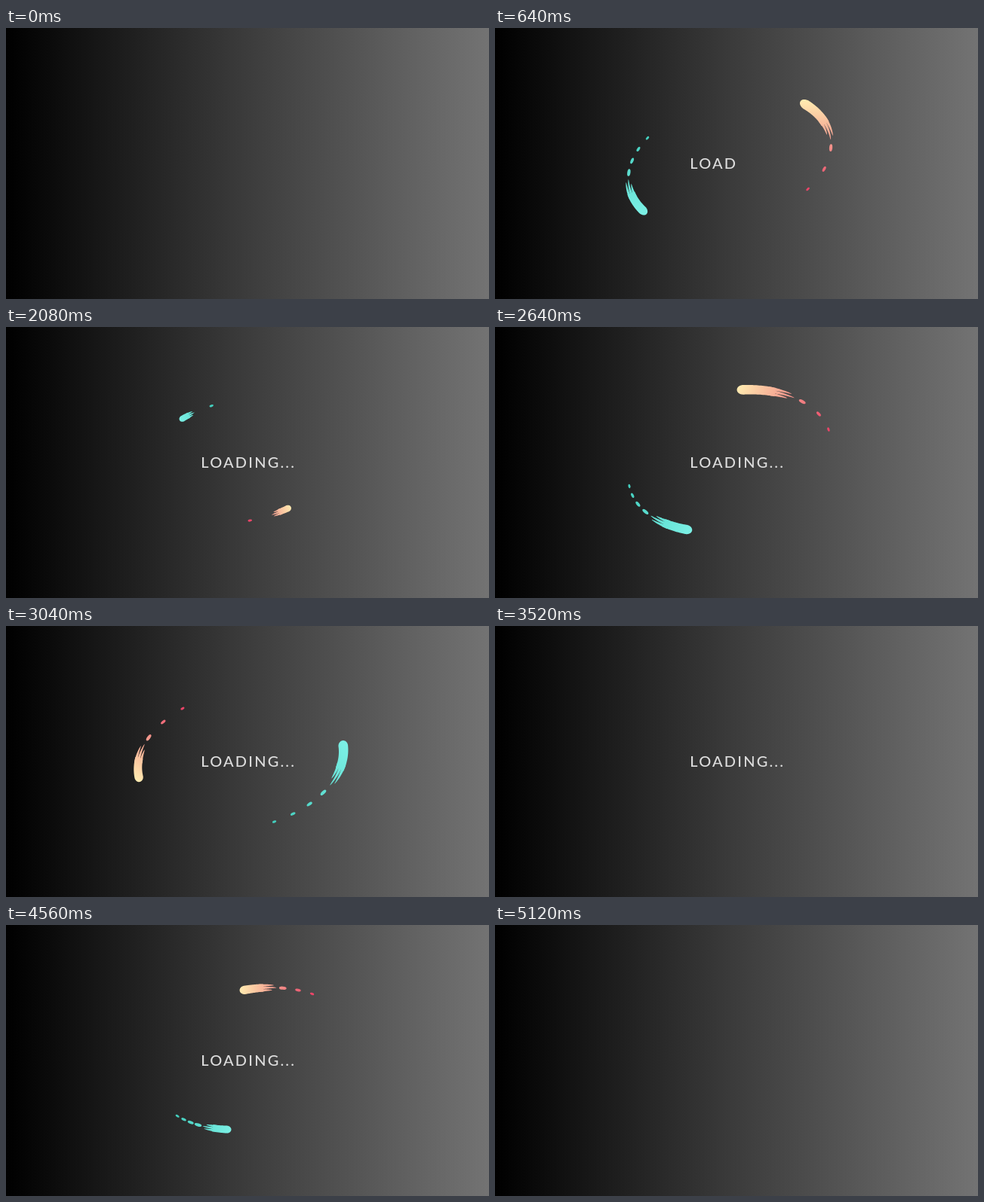
Animation of 640x360 px, one loop 5200 ms. Source, as an HTML page with a canvas:

```html
<!DOCTYPE html>
<html lang="en">
<head>
<meta charset="utf-8">
<title>Loading</title>
<style>
  html, body { margin: 0; width: 100%; height: 100%; overflow: hidden; background: #000; }
  canvas { display: block; width: 640px; height: 360px; }
</style>
</head>
<body>
<canvas id="stage" width="640" height="360"></canvas>
<script>
const ctx = document.getElementById('stage').getContext('2d');
const LOOP = 5200, STEP = 80, CYCLE = 1760, END = 5120;
const LABEL = 'LOADING...';
const RAD = Math.PI / 180;
const ORBIT = { rx: 137, ry: 86, tilt: 12 * RAD };

// A brush sweeps from one angle to the other, then on round to where it began.
const brushes = [
  { x: 310, y: 172, from: -95, to: 92, drops: 3, colors: ['#ffeab0', '#f3978c', '#ec4468'] },
  { x: 312, y: 183, from: 97, to: 252, drops: 4, colors: ['#7cf0e5', '#60dfd2', '#43cfbe'] }
];

const mix = (a, b, t) => a + (b - a) * t;
const headEase = t => 1 - Math.pow(1 - t, 2.4);
const tailEase = t => Math.pow(t, 1.5);

function orbit(brush, deg) {
  const { rx, ry, tilt } = ORBIT;
  const u = rx * Math.cos(deg * RAD), v = ry * Math.sin(deg * RAD);
  return [
    brush.x + u * Math.cos(tilt) - v * Math.sin(tilt),
    brush.y - u * Math.sin(tilt) - v * Math.cos(tilt)
  ];
}

function heading(brush, deg) {
  const p = orbit(brush, deg - 1), q = orbit(brush, deg + 1);
  return Math.atan2(q[1] - p[1], q[0] - p[0]);
}

const distance = (p, q) => Math.hypot(p[0] - q[0], p[1] - q[1]);

// Band along the orbit; samples are denser at its start to keep the cap round.
function ribbon(brush, from, to, half, shift) {
  const left = [], right = [], n = 40;
  for (let i = 0; i <= n; i++) {
    const t = (i / n) ** 2, deg = mix(from, to, t);
    const [x, y] = orbit(brush, deg), angle = heading(brush, deg);
    const nx = -Math.sin(angle), ny = Math.cos(angle), h = half(t);
    left.push([x + nx * (shift + h), y + ny * (shift + h)]);
    right.unshift([x + nx * (shift - h), y + ny * (shift - h)]);
  }
  ctx.beginPath();
  left.concat(right).forEach(([x, y]) => ctx.lineTo(x, y));
  ctx.fill();
}

function drawSweep(brush, from, to, t) {
  const head = mix(from, to, headEase(t)), tail = mix(from, to, tailEase(t));
  const end = mix(head, tail, .5);
  const a = orbit(brush, head), m = orbit(brush, end), b = orbit(brush, tail);
  const size = distance(a, m), gap = distance(m, b);
  const width = Math.min(13, 6 + size / 9);

  const paint = ctx.createLinearGradient(...a, ...b);
  brush.colors.forEach((c, i) => paint.addColorStop(i / 2, c));
  ctx.fillStyle = paint;

  const solid = .62, cap = Math.min(1, width * .6 / (size * solid));
  const round = s => s < cap ? Math.sqrt(1 - (1 - s / cap) ** 2) : 1;
  ribbon(brush, head, mix(head, end, solid), s => width / 2 * round(s) * (1 - .12 * s), 0);
  for (const side of [-1, 0, 1]) {
    const stop = 1 - .12 * Math.abs(side - .2);
    ribbon(brush, mix(head, end, .5), mix(head, end, stop),
      s => width * .17 * Math.pow(1 - s, .6), side * width * .28);
  }

  const count = gap < 32 ? 1 : brush.drops;
  for (let i = 1; i <= count; i++) {
    const f = count === 1 ? 1 : mix(.14, 1, (i - 1) / (count - 1));
    const deg = mix(end, tail, f);
    ctx.beginPath();
    ctx.ellipse(...orbit(brush, deg), 5.2 - 2.4 * f, 2.2 - .7 * f,
      heading(brush, deg), 0, Math.PI * 2);
    ctx.fill();
  }
}

function drawBrush(brush, phase) {
  const first = (phase - 260) / 940, second = (phase - 1160) / 440;
  if (first > 0 && phase < 1200) drawSweep(brush, brush.from, brush.to, first);
  else if (phase >= 1200 && second < 1) drawSweep(brush, brush.to, brush.from + 360, second);
}

const back = ctx.createLinearGradient(0, 0, 640, 0);
back.addColorStop(0, '#000');
back.addColorStop(.02, '#020202');
back.addColorStop(.5, '#3c3c3c');
back.addColorStop(1, '#737373');

function draw(time) {
  ctx.fillStyle = back;
  ctx.fillRect(0, 0, 640, 360);
  if (time >= END) return;

  // The last round runs a little further right.
  ctx.save();
  if (time >= CYCLE * 2) ctx.translate(16, 0);
  brushes.forEach(b => drawBrush(b, time % CYCLE));
  ctx.restore();

  ctx.font = '500 20px Lato, sans-serif';
  ctx.letterSpacing = '2.2px';
  ctx.fillStyle = '#dcdcdc';
  ctx.fillText(LABEL.slice(0, Math.floor(time / 160)), 258.3, 187.3);
}

const start = performance.now();
function tick() {
  const time = (performance.now() - start) % LOOP;
  draw(Math.floor(time / STEP) * STEP);
  requestAnimationFrame(tick);
}
tick();
</script>
</body>
</html>
```
